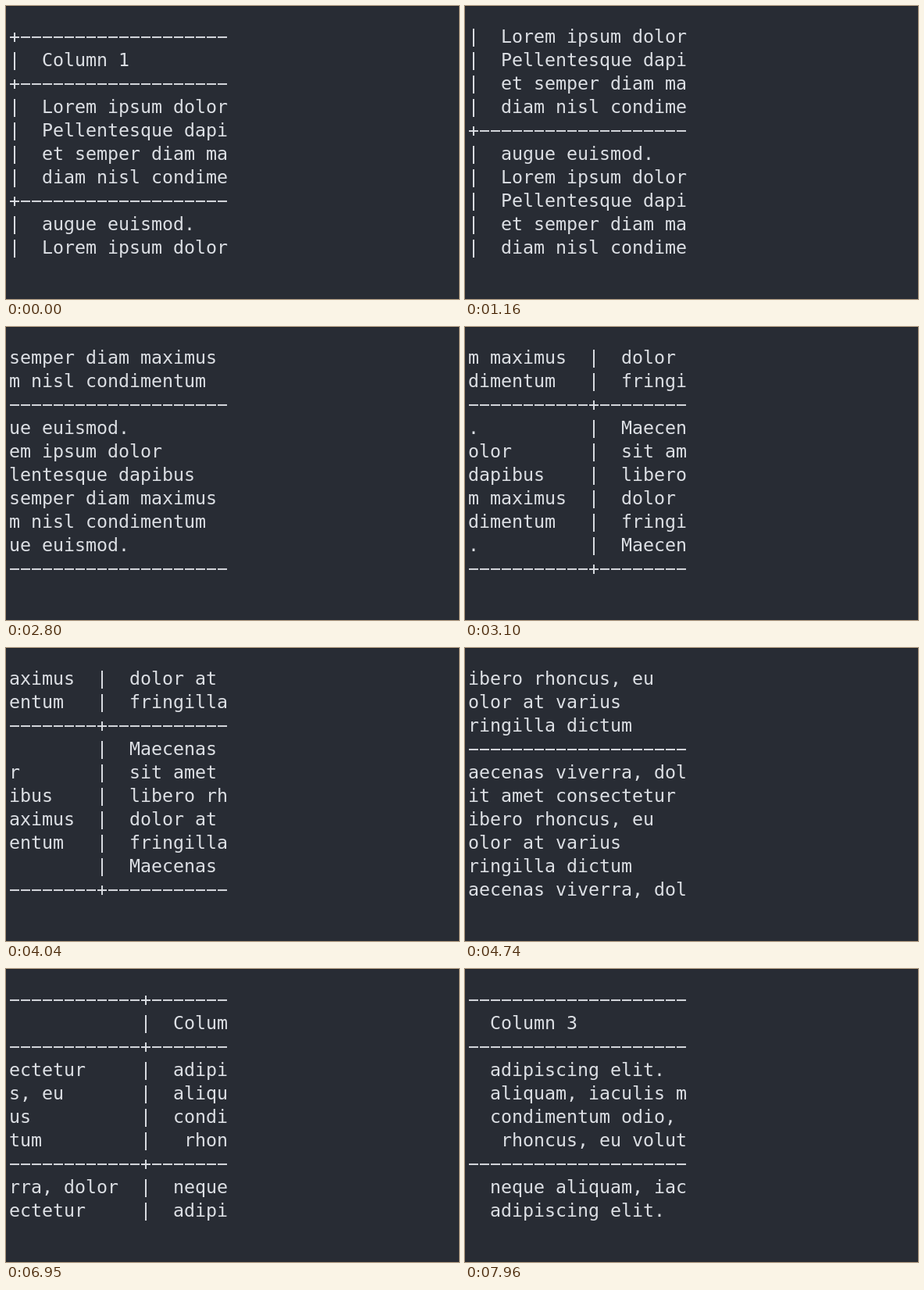
An HTML page for the animation above (8 s loop, 580 by 375 pixels).

```html
<!DOCTYPE html>
<html lang="en">
<head>
<meta charset="utf-8">
<title>Table viewport</title>
<style>
  html, body { margin: 0; width: 100%; height: 100%; overflow: hidden; background: #282c34; }
  body { box-shadow: inset 0 1px #20242b; }
  pre {
    position: absolute; left: 4px; top: 24px; margin: 0;
    font: 23.25px/30px "DejaVu Sans Mono", monospace;
    font-variant-ligatures: none;
    color: #dcdfe4;
  }
</style>
</head>
<body>
<pre id="view"></pre>
<script>
const LOOP = 8000, COLS = 20, ROWS = 10;
const widths = [22, 23, 24];

const row = (...cells) =>
  "|" + cells.map((c, i) => "  " + c.padEnd(widths[i]) + "  |").join("");
const rule = "+" + widths.map(w => "\u2212".repeat(w + 4) + "+").join("");

const body = [
  row("Lorem ipsum dolor", "sit amet consectetur", "adipiscing elit."),
  row("Pellentesque dapibus", "libero rhoncus, eu", "aliquam, iaculis mi"),
  row("et semper diam maximus", "dolor at varius", "condimentum odio, et"),
  row("diam nisl condimentum", "fringilla dictum", " rhoncus, eu volutpat"),
];
const last = row("augue euismod.", "Maecenas viverra, dolor", "neque aliquam, iaculis");
const table = [
  rule, row("Column 1", "Column 2", "Column 3"), rule,
  ...body, rule, last, ...body, last, rule,
];

// Viewport moves: [time, column, line]
const moves = [[0, 0, 0]];
const step = (t, x, y) => moves.push([t, x, y]);
// A held arrow key: evenly timed jumps from column x0 to x1
const hold = (t0, t1, n, x0, x1, y) => {
  for (let i = 0; i < n; i++) {
    const k = i / (n - 1);
    step(t0 + (t1 - t0) * k, Math.floor(x0 + (x1 - x0) * k + 1e-6), y);
  }
};

[610, 930, 1160, 1480, 1630].forEach((t, i) => step(t, 0, i + 1));
step(2190, 1, 5);
hold(2640, 3100, 7, 2, 16, 5);
step(3350, 17, 5);
step(3580, 18, 5);
hold(4040, 4430, 6, 19, 31, 5);
step(4740, 31, 4);
step(5290, 31, 2);
step(5370, 31, 0);
step(6100, 32, 0);
step(6650, 34, 0);
step(6720, 36, 0);
step(6900, 41, 0);
step(6950, 43, 0);
step(7180, 44, 0);
hold(7660, 7960, 5, 46, 56, 0);

const view = document.getElementById("view");
let shown;
function draw() {
  const t = performance.now() % LOOP;
  const move = moves.findLast(m => m[0] <= t);
  if (move !== shown) {
    shown = move;
    const [, x, y] = move;
    view.textContent = table.slice(y, y + ROWS).map(s => s.slice(x, x + COLS)).join("\n");
  }
  requestAnimationFrame(draw);
}
draw();
</script>
</body>
</html>
```
